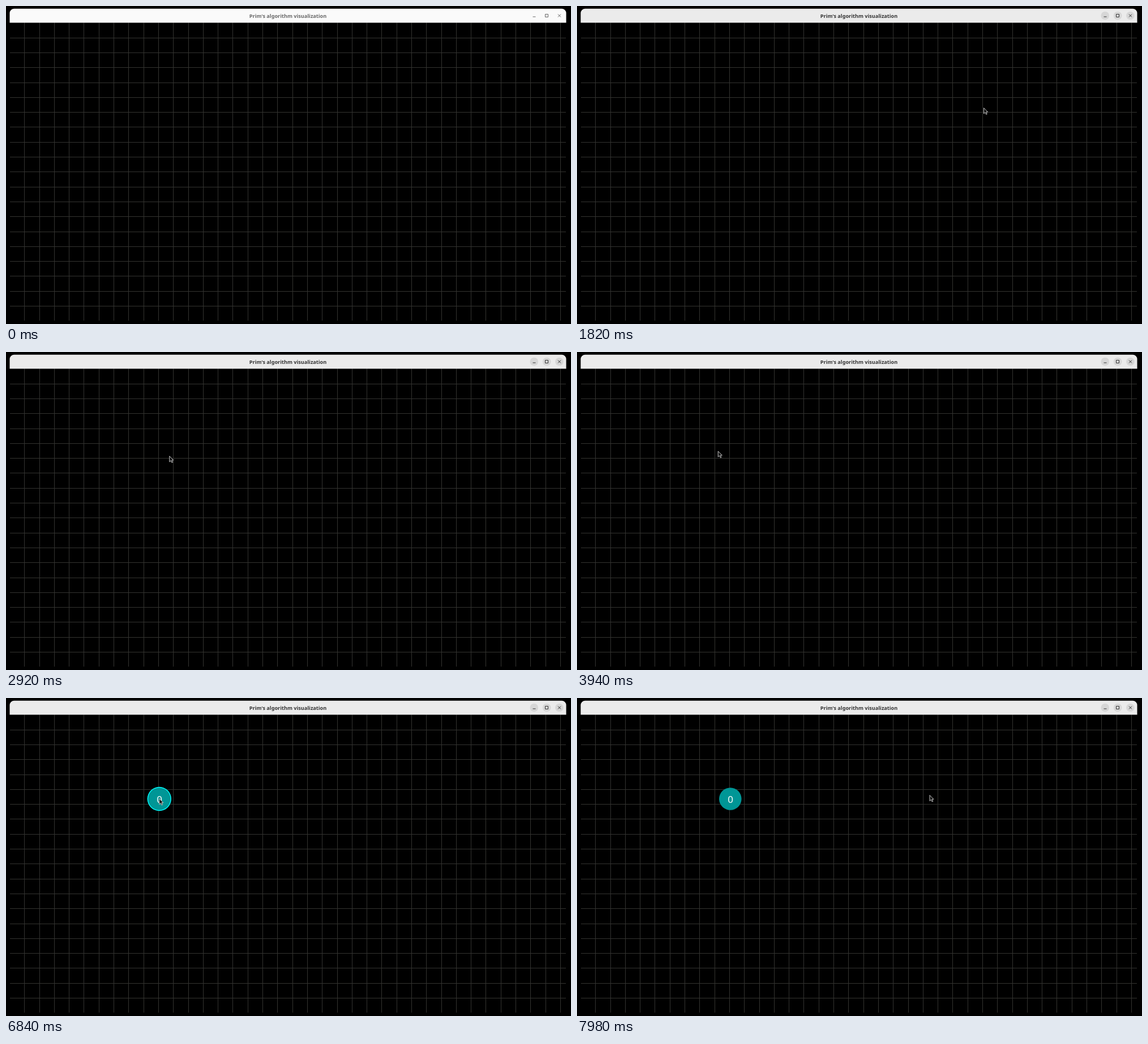
An HTML page with a canvas that plays this animation: 998 px wide and 561 px high, repeating every 8 s.

```html
<!DOCTYPE html>
<html lang="en">
<head>
<meta charset="utf-8">
<title>Prim's algorithm visualization</title>
<style>
  html, body { margin: 0; width: 100%; height: 100%; overflow: hidden; background: #000; }
  canvas { display: block; }
</style>
</head>
<body>
<canvas id="stage" width="998" height="561"></canvas>
<script>
const ctx = document.getElementById('stage').getContext('2d');
const LOOP = 8000, STEP = 20, FOCUS = 1820, NODE_ADDED = 6840;
const CELL = 26.3;
const node = { x: 270.8, y: 178, r: 19.8 };

// The pointer rests between moves; bow bends a move downwards.
const entry = { x: 980, y: 518 };
const moves = [
  { start: 540, end: 1120, x: 718, y: 179.3, bow: 0 },
  { start: 1820, end: 2540, x: 368, y: 200, bow: 0 },
  { start: 2640, end: 3080, x: 254, y: 169, bow: 6 },
  { start: 3660, end: 3940, x: 248.7, y: 174.5, bow: 0 },
  { start: 5900, end: 6160, x: 270.3, y: 177, bow: 0 },
  { start: 6980, end: 7720, x: 574, y: 181, bow: 12 },
  { start: 7820, end: 7980, x: 622.5, y: 171, bow: 0 }
];

const ease = k => k * k * (3 - 2 * k);

function pointerAt(t) {
  let { x, y } = entry;
  for (const m of moves) {
    if (t < m.start) break;
    const k = ease(Math.min(1, (t - m.start) / (m.end - m.start)));
    x += (m.x - x) * k;
    y += (m.y - y) * k + m.bow * Math.sin(Math.PI * k);
  }
  return { x, y };
}

function disc(x, y, r, fill) {
  ctx.beginPath();
  ctx.arc(x, y, r, 0, 2 * Math.PI);
  ctx.fillStyle = fill;
  ctx.fill();
}

function label(text, x, y, font, color) {
  ctx.font = font;
  ctx.textAlign = 'center';
  ctx.fillStyle = color;
  ctx.fillText(text, x, y);
}

function drawGrid() {
  ctx.fillStyle = '#333330';
  for (let x = 32.2; x < 989; x += CELL) ctx.fillRect(Math.round(x), 29, 1, 526);
  for (let y = 55.6; y < 555; y += CELL) ctx.fillRect(7, Math.round(y), 982, 1);
}

function drawTitleBar(focused) {
  ctx.beginPath();
  ctx.roundRect(6.5, 4.7, 983, 24.8, [8, 8, 0, 0]);
  ctx.fillStyle = focused ? '#ebebeb' : '#fafafa';
  ctx.fill();

  const ink = focused ? '#333' : '#686868';
  label("Prim's algorithm visualization", 498, 20.7,
    'bold 9.13px "Noto Sans", sans-serif', ink);

  const buttons = [0, 1, 2].map(i => 932.8 + i * 22.3);
  if (focused) for (const x of buttons) disc(x, 17, 7.3, '#d7d7d7');
  ctx.strokeStyle = ink;
  ctx.lineWidth = 1;
  ctx.stroke(new Path2D('M930.5 19h5M952.5 14.5h5v5h-5zM975 14.5l5 5m0-5l-5 5'));
}

function drawNode(hovered) {
  if (hovered) disc(node.x, node.y, 21.2, '#00ffff');
  disc(node.x, node.y, node.r, '#009696');
  label('0', 271, 185.2, '17px "Noto Sans", sans-serif', '#fff');
}

const arrow = new Path2D('M.5 .5V10.6L2.9 8.4L4.7 12L6.3 11.2L4.6 7.7H7.6Z');

function drawPointer({ x, y }) {
  ctx.save();
  ctx.translate(x, y);
  ctx.fillStyle = '#111';
  ctx.fill(arrow);
  ctx.strokeStyle = '#d8d8d8';
  ctx.lineWidth = 0.9;
  ctx.stroke(arrow);
  ctx.restore();
}

function draw(now) {
  const t = Math.floor(now % LOOP / STEP) * STEP;
  const tip = pointerAt(t);
  ctx.fillStyle = '#000';
  ctx.fillRect(0, 0, 998, 561);
  drawGrid();
  drawTitleBar(t >= FOCUS);
  if (t >= NODE_ADDED) drawNode(Math.hypot(tip.x - node.x, tip.y - node.y) < node.r);
  if (t >= moves[0].start) drawPointer(tip);
}

const start = performance.now();
function tick() {
  draw(performance.now() - start);
  requestAnimationFrame(tick);
}
tick();
</script>
</body>
</html>
```
